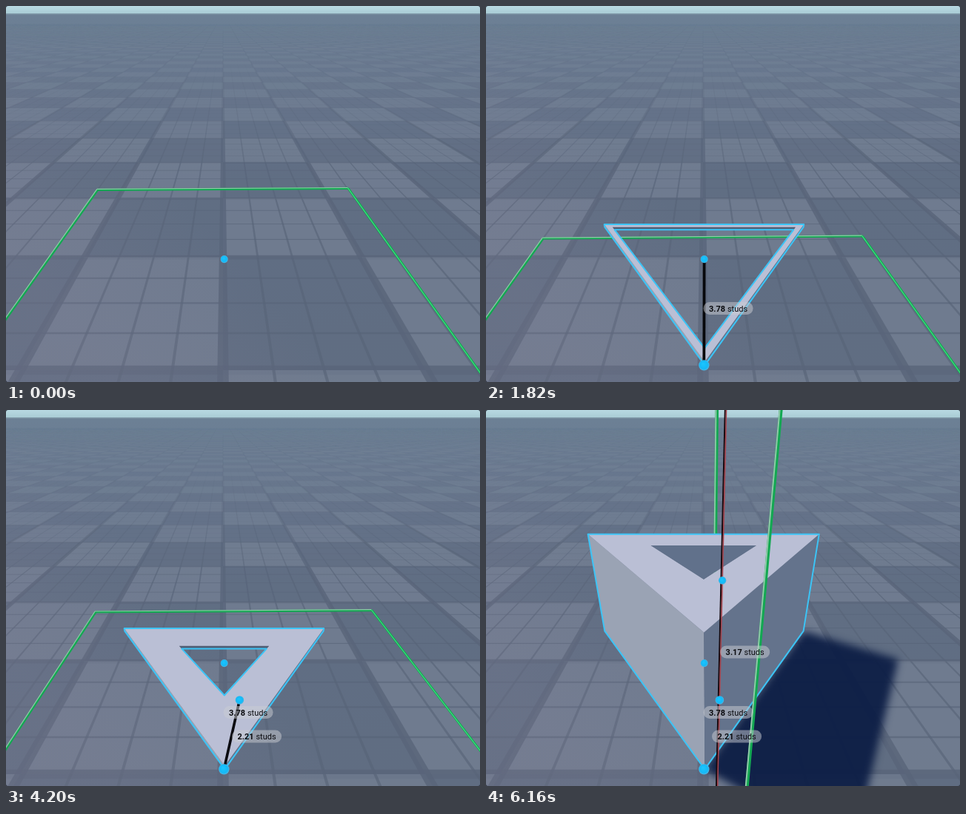
Write an HTML page with a canvas that moves like this. It is 640 px wide and 508 px high and loops after 6580 ms.

```html
<!DOCTYPE html>
<html lang="en">
<head>
<meta charset="utf-8">
<title>Triangle tool</title>
<style>
  html, body { margin: 0; width: 100%; height: 100%; overflow: hidden; background: #2a3342; }
  canvas { display: block; width: 640px; height: 508px; border-radius: 3px; }
</style>
</head>
<body>
<canvas id="stage" width="640" height="508"></canvas>
<script>
const W = 640, H = 508, LOOP = 6580, STEP = 70;
const EXTRUDE_AT = 4410, WALL_AT = 1890;
const ctx = document.getElementById('stage').getContext('2d');

// Camera: ground units are studs, x to the right, z away from the viewer.
const HORIZON = 10, CENTER = 293, VP = { x: 299, y: 1100 };
const scaleAt = z => 1 / (0.002075 + 0.00024 * z);

function project(x, z, h = 0) {
  const s = scaleAt(z), a = 0.0001535 * s * h;
  return {
    x: (CENTER + 0.142 * x * s - a * VP.x) / (1 - a),
    y: (HORIZON + s - a * VP.y) / (1 - a),
    s
  };
}

// Monotone cubic through [time, value] keys.
function track(keys) {
  const n = keys.length;
  const slope = i => (keys[i + 1][1] - keys[i][1]) / (keys[i + 1][0] - keys[i][0]);
  const tangent = i => {
    if (i === 0 || i === n - 1) return 0;
    const a = slope(i - 1), b = slope(i);
    return a * b > 0 ? 2 * a * b / (a + b) : 0;
  };
  return t => {
    if (t <= keys[0][0]) return keys[0][1];
    if (t >= keys[n - 1][0]) return keys[n - 1][1];
    let i = 0;
    while (t > keys[i + 1][0]) i++;
    const [t0, v0] = keys[i], [t1, v1] = keys[i + 1];
    const d = t1 - t0, u = (t - t0) / d, u2 = u * u, u3 = u2 * u;
    return v0 + (v1 - v0) * (3 * u2 - 2 * u3)
      + d * ((u3 - 2 * u2 + u) * tangent(i) + (u3 - u2) * tangent(i + 1));
  };
}

const radiusAt = track([[0, 0], [210, .5], [490, 2.1], [700, 2.9], [1190, 3.59], [1610, 3.78]]);
const wallAt = track([[WALL_AT, 0], [2170, .17], [2450, .61], [2800, 1.3], [3220, 1.78], [3500, 2.08], [4200, 2.21]]);
const heightAt = track([[EXTRUDE_AT - STEP, 0], [4690, .32], [4970, .91], [5250, 1.75], [5530, 2.6], [5740, 3.03], [6160, 3.17]]);

const HUB = { x: .035, z: 3.9 };
const MIN_WALL = .36, MIN_HEIGHT = .1;
const BLUE = '#3cc4f6';

function trace(c, pts) {
  c.beginPath();
  pts.forEach((p, i) => i ? c.lineTo(p.x, p.y) : c.moveTo(p.x, p.y));
  c.closePath();
}

function fill(c, pts, color) {
  trace(c, pts);
  c.fillStyle = color;
  c.fill();
}

function line(a, b, width, color, dx = 0, dy = 0) {
  ctx.lineWidth = width;
  ctx.strokeStyle = color;
  ctx.beginPath();
  ctx.moveTo(a.x + dx, a.y + dy);
  ctx.lineTo(b.x + dx, b.y + dy);
  ctx.stroke();
}

function paintFloor() {
  const cv = document.createElement('canvas');
  cv.width = W;
  cv.height = H;
  const c = cv.getContext('2d');
  const ramp = (x0, y0, x1, y1, ...stops) => {
    const g = c.createLinearGradient(x0, y0, x1, y1);
    stops.forEach(([o, col]) => g.addColorStop(o, col));
    return g;
  };
  const quad = (x0, x1, z0, z1, color) =>
    fill(c, [project(x0, z0), project(x1, z0), project(x1, z1), project(x0, z1)], color);

  c.fillStyle = ramp(0, 10, 0, H, [0, '#6c8095'], [.1, '#6c7d93'], [.45, '#68758b'], [1, '#687487']);
  c.fillRect(0, 0, W, H);

  for (let row = 70; row >= -1; row--) {
    const z = row * 4, s = scaleAt(z);
    const cols = Math.ceil(360 / (.568 * scaleAt(z + 4))) + 1;
    const k = Math.min(1, .06 + s / 230);
    const fine = Math.max(0, Math.min(1, (s - 70) / 170));
    for (let col = -cols; col < cols; col++) {
      const light = (row + col) & 1;
      quad(col * 4, col * 4 + 4, z, z + 4,
        light ? `rgba(115,127,146,${.68 * k})` : `rgba(93,105,127,${.6 * k})`);
    }
    const far = cols * 4;
    if (fine > 0) {
      const ink = `rgba(88,100,121,${.65 * fine})`;
      for (let i = 1; i < 4; i++) quad(-far, far, z + i - .03, z + i + .03, ink);
      for (let x = -far; x < far; x++)
        if (x % 4) quad(x - .03, x + .03, z, z + 4, ink);
    }
    const ink = `rgba(89,101,122,${.8 * k * k})`;
    quad(-far, far, z - .11, z + .11, ink);
    for (let x = -far; x <= far; x += 4) quad(x - .11, x + .11, z, z + 4, ink);
  }

  c.fillStyle = ramp(0, 330, 170, 180, [0, 'rgba(142,132,156,.17)'], [1, 'rgba(142,132,156,0)']);
  c.fillRect(0, 12, W, H);
  c.fillStyle = ramp(0, 0, 0, 10, [0, '#b8d9e2'], [1, '#a9ccd5']);
  c.fillRect(0, 0, W, 10);
  c.fillStyle = '#7f97a7';
  c.fillRect(0, 10, W, 1.5);
  return cv;
}

const floor = paintFloor();

// A green bar whose upper-left side catches the light.
function greenBar(a, b, width = 3.2, glint = '#93c9aa') {
  const off = -width * .28;
  line(a, b, width, '#13a852');
  line(a, b, width * .38, glint, off, off);
}

function groundGuide(p) {
  const r = 5.02;
  const [a, b, c, d] = [[-r, r - .08], [r, r + .06], [r, -r], [-r, -r]]
    .map(([x, z]) => project(p.x + x, p.z + z));
  greenBar(a, b);
  greenBar(b, c, 3, '#3fdc80');
  greenBar(a, d);
}

function uprightGuide(p, h) {
  const edge = (x, z) => [project(p.x + x, p.z + z, h + 5), project(p.x + x, p.z + z)];
  return { far: edge(.01, 5.1), near: edge(-.03, -5.13) };
}

function corners(r, h = 0) {
  const sx = r * Math.sqrt(3) / 2;
  return [[-sx, r / 2], [sx, r / 2], [0, -r]].map(([x, z]) => project(HUB.x + x, HUB.z + z, h));
}

function castShadow(r, h) {
  const sx = r * Math.sqrt(3) / 2, dx = .75 * h, dz = -.53 * h;
  const b = { x: HUB.x + sx, z: HUB.z + r / 2 }, c = { x: HUB.x, z: HUB.z - r };
  ctx.save();
  ctx.filter = `blur(${Math.min(5.5, 1 + 7 * h)}px)`;
  fill(ctx, [project(b.x, b.z), project(b.x + dx, b.z + dz), project(c.x + dx, c.z + dz), project(c.x, c.z)],
    'rgba(11,29,68,.93)');
  ctx.restore();
}

function prism(r, wall, h) {
  const [a, b, c] = corners(r), [at, bt, ct] = corners(r, h);
  const inner = Math.max(0, r - wall);
  const hole = corners(inner, h), base = corners(inner);
  const [ha, hb, hc] = hole;

  fill(ctx, [a, c, ct, at], '#9aa3b4');
  fill(ctx, [b, c, ct, bt], '#64738c');

  // Top ring, leaving the hole open to the floor.
  ctx.beginPath();
  for (const tri of [[at, bt, ct], hole]) {
    tri.forEach((p, i) => i ? ctx.lineTo(p.x, p.y) : ctx.moveTo(p.x, p.y));
    ctx.closePath();
  }
  ctx.fillStyle = '#babfd5';
  ctx.fill('evenodd');

  ctx.lineJoin = 'round';
  ctx.lineWidth = 2;
  ctx.strokeStyle = BLUE;

  if (inner > 0) {
    const yb = base[0].y;
    ctx.save();
    trace(ctx, hole);
    ctx.clip();
    fill(ctx, [ha, hb, base[1], base[0]], h > .3 ? '#61718b' : '#505d74');
    if (h > .3) {
      const g = ctx.createLinearGradient(0, yb, 0, yb + 14 + 10 * h);
      g.addColorStop(0, 'rgba(11,29,68,.95)');
      g.addColorStop(.4, 'rgba(11,29,68,.75)');
      g.addColorStop(.7, 'rgba(11,29,68,.1)');
      ctx.fillStyle = g;
      ctx.fillRect(0, yb, W, H);
    }
    ctx.restore();
    if (yb < hc.y) {
      const u = (yb - ha.y) / (hc.y - ha.y);
      const cut = p => ({ x: p.x + (hc.x - p.x) * u, y: yb });
      trace(ctx, [cut(ha), cut(hb), hc]);
      ctx.stroke();
    }
  }
  trace(ctx, [a, at, bt, b, c]);
  ctx.stroke();
}

function dot(p, r = p.s * .0151) {
  const g = ctx.createRadialGradient(p.x - r * .2, p.y - r * .3, 0, p.x, p.y, r);
  g.addColorStop(0, '#1cc6ff');
  g.addColorStop(.75, '#14b9f7');
  g.addColorStop(1, '#4fb6e2');
  ctx.fillStyle = g;
  ctx.beginPath();
  ctx.arc(p.x, p.y, r, 0, 7);
  ctx.fill();
}

function tag(p, value) {
  const num = value.toFixed(2), x = p.x - 1, y = p.y + 7.5;
  ctx.font = 'bold 11px Roboto, sans-serif';
  const w = ctx.measureText(num).width;
  ctx.font = '11px Roboto, sans-serif';
  const w2 = ctx.measureText(' studs').width;
  ctx.fillStyle = 'rgba(203,206,212,.5)';
  ctx.beginPath();
  ctx.roundRect(x, y - 8.5, w + w2 + 15, 17, 8.5);
  ctx.fill();
  ctx.fillStyle = '#0b0c10';
  ctx.fillText(' studs', x + 7.5 + w, y + 4);
  ctx.font = 'bold 11px Roboto, sans-serif';
  ctx.fillText(num, x + 7.5, y + 4);
}

function axis(p) {
  const at = y => ({ x: VP.x - 1 + (p.x - VP.x) * (VP.y - y) / (VP.y - p.y), y });
  line(at(0), at(H), 2, '#17090e', -.7);
  line(at(0), at(H), 1.6, '#a5434c', 1);
}

function draw(t) {
  const r = radiusAt(t), d = wallAt(t), h = heightAt(t);
  const walling = t >= WALL_AT, upright = t >= EXTRUDE_AT;
  const tip = { x: HUB.x - .015, z: HUB.z - r };
  const cursor = { x: tip.x + .178 * d, z: tip.z + .97 * d };
  const hub = project(HUB.x, HUB.z), tipAt = project(tip.x, tip.z);
  const cursorAt = project(cursor.x, cursor.z);
  const between = (a, b) => project((a.x + b.x) / 2, (a.z + b.z) / 2);
  const guide = upright && uprightGuide(cursor, h);

  ctx.drawImage(floor, 0, 0);
  if (upright) {
    castShadow(r, h);
    greenBar(...guide.far, 4.6);
  } else groundGuide(cursor);

  if (r > .05) prism(r, Math.max(MIN_WALL, d), Math.max(MIN_HEIGHT, h));

  if (upright) {
    greenBar(guide.far[0], guide.near[0], 3.4);
    greenBar(...guide.near, 5);
    axis(cursorAt);
  } else if (walling) line(tipAt, cursorAt, 3.6, '#0a0a10');
  else if (r > 0) line(hub, tipAt, 3.8, '#07080c');

  dot(hub);
  if (r > 0) dot(tipAt);
  if (walling) dot(cursorAt);
  if (upright) dot(project(cursor.x, cursor.z, h), 5.2);

  if (r > 0) tag(between(HUB, tip), r);
  if (walling) tag(between(tip, cursor), d);
  if (upright) tag(project(cursor.x, cursor.z, h / 2), h);
}

const start = performance.now();
function tick() {
  const t = (performance.now() - start) % LOOP;
  draw(Math.floor(t / STEP) * STEP);
  requestAnimationFrame(tick);
}
tick();
</script>
</body>
</html>
```
